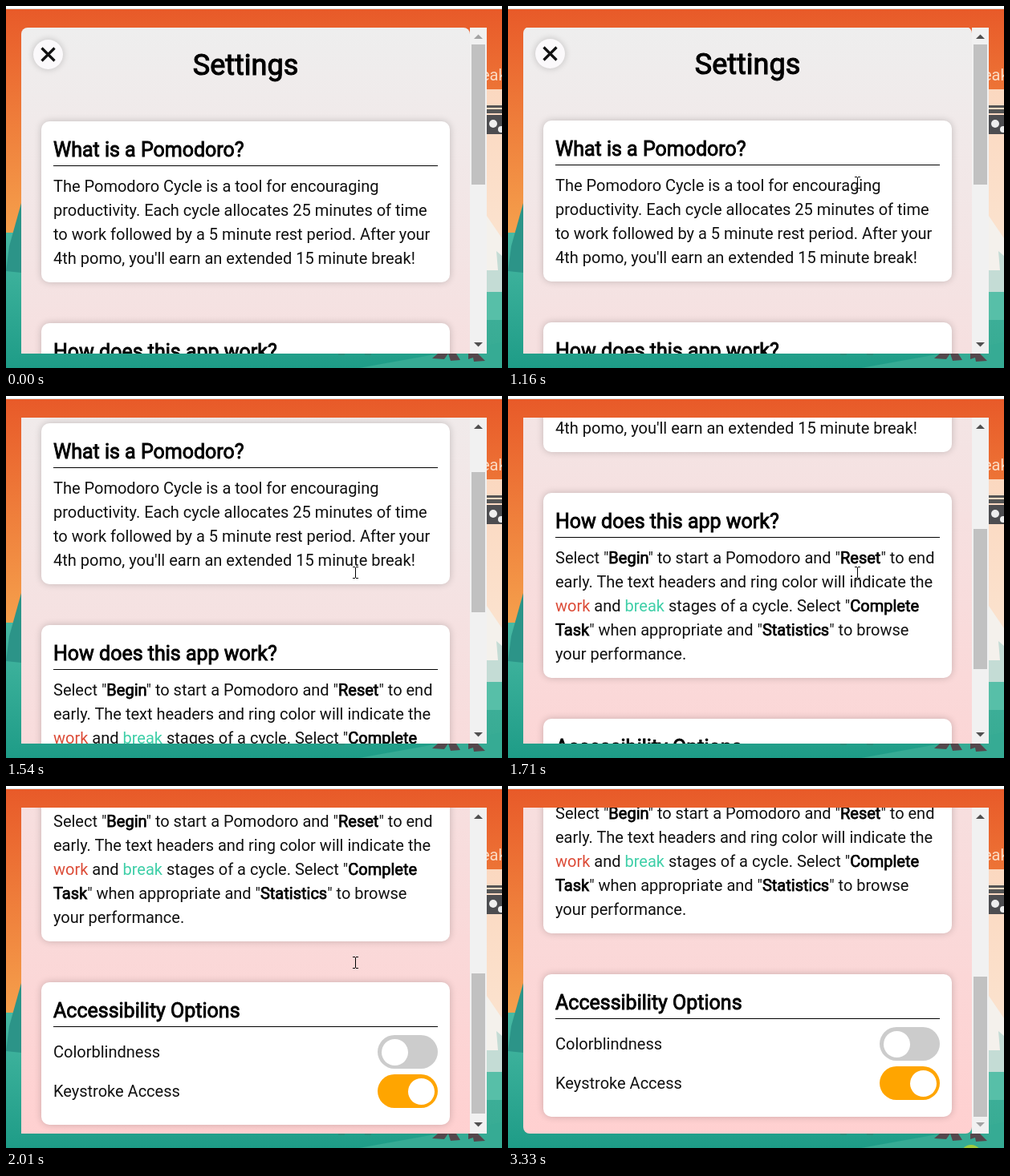
These frames come from a looping animation (618x452 px, 3.42 s). An HTML page with a canvas:

```html
<!DOCTYPE html>
<html lang="en">
<head>
<meta charset="utf-8">
<title>Settings panel</title>
<style>
html, body { margin: 0; width: 618px; height: 452px; overflow: hidden; }
body { position: relative; font: 20px/30px Roboto, sans-serif; color: #111; }
canvas { position: absolute; left: 0; top: 0; }
#view { position: absolute; left: 19px; top: 27px; width: 559px; height: 407px; overflow: hidden; }
#page { position: relative; height: 850px; border-radius: 8px; background: linear-gradient(#eee, #ffd0d0); }
h1, h2, p { position: absolute; margin: 0; white-space: nowrap; font-weight: 400; }
h1 { left: 0; width: 100%; top: 26px; font-size: 36px; line-height: 42px; text-align: center;
  color: #000; -webkit-text-stroke: 1.1px; }
h2 { left: 15px; top: 21px; font-size: 25px; line-height: 29px; color: #000; -webkit-text-stroke: .9px; }
p { left: 15px; top: 66px; }
b { font-weight: 400; color: #000; -webkit-text-stroke: .75px; }
.card { position: absolute; left: 25px; width: 509px; border-radius: 10px; background: #fff;
  box-shadow: 0 0 10px rgba(0, 0, 0, .2); }
.card::after { content: ""; position: absolute; left: 15px; top: 55px; width: 479px; height: 1px; background: #000; }
.work { color: #dc4c38; }
.break { color: #3fcfa8; }
.toggle { position: absolute; left: 419px; width: 75px; height: 42px; border-radius: 21px; background: #ccc; }
.toggle::after { content: ""; position: absolute; left: 5px; top: 4.5px; width: 33px; height: 33px;
  border-radius: 50%; background: #fff; }
.toggle.on { background: #ffa500; }
.toggle.on::after { left: 37.5px; }
#close { position: absolute; left: 14.5px; top: 14.5px; width: 37px; height: 37px; border-radius: 50%;
  background: #fbf9fb; box-shadow: 0 0 8px rgba(0, 0, 0, .2); }
#close svg { display: block; }
</style>
</head>
<body>
<canvas id="scene" width="618" height="452"></canvas>
<div id="view">
  <div id="page">
    <div id="close"><svg width="37" height="37"><path d="M10.5 10.5l16 16m0-16l-16 16" stroke="#111" stroke-width="3.2"/></svg></div>
    <h1>Settings</h1>
    <div class="card" style="top:117px;height:201px">
      <h2>What is a Pomodoro?</h2>
      <p>The Pomodoro Cycle is a tool for encouraging<br>
        productivity. Each cycle allocates 25 minutes of time<br>
        to work followed by a 5 minute rest period. After your<br>
        4th pomo, you'll earn an extended 15 minute break!</p>
    </div>
    <div class="card" style="top:369px;height:231px">
      <h2>How does this app work?</h2>
      <p>Select "<b>Begin</b>" to start a Pomodoro and "<b>Reset</b>" to end<br>
        early. The text headers and ring color will indicate the<br>
        <span class="work">work</span> and <span class="break">break</span> stages of a cycle. Select "<b>Complete</b><br>
        <b>Task</b>" when appropriate and "<b>Statistics</b>" to browse<br>
        your performance.</p>
    </div>
    <div class="card" style="top:651px;height:178px">
      <h2>Accessibility Options</h2>
      <p style="top:72px">Colorblindness</p>
      <p style="top:121px">Keystroke Access</p>
      <div class="toggle" style="top:66px"></div>
      <div class="toggle on" style="top:115px"></div>
    </div>
  </div>
</div>
<canvas id="overlay" width="618" height="452"></canvas>
<script>
const LOOP = 3420, MAX_SCROLL = 443;
const page = document.getElementById('page');
const bg = document.getElementById('scene').getContext('2d');
const top2d = document.getElementById('overlay').getContext('2d');

// [time, scroll offset]
const scrollKeys = [
  [0, 0], [1160, 1], [1240, 10], [1320, 30], [1400, 62], [1480, 110], [1560, 166], [1630, 219],
  [1710, 275], [1780, 324], [1860, 371], [1930, 406], [2010, 433], [2090, 441], [2170, 443]
];
// [time, pointer shape, x, y]
const pointerKeys = [
  [0, ''], [230, 'arrow', 543, 412], [310, 'arrow', 515, 366], [400, 'beam', 474, 298],
  [480, 'beam', 440, 242], [560, 'beam', 422, 212], [650, 'beam', 429, 216], [730, 'beam', 435, 220],
  [2550, 'arrow', 436, 244], [2630, 'arrow', 445, 258], [2710, 'arrow', 464, 290],
  [2790, 'arrow', 494, 341], [2860, 'arrow', 526, 396], [2940, 'arrow', 553, 436], [3020, '']
];

function keyAt(keys, t) {
  let key = keys[0];
  for (const k of keys) if (k[0] <= t) key = k;
  return key;
}

function rect(c, color, x, y, w, h) {
  c.fillStyle = color;
  c.fillRect(x, y, w, h);
}

function poly(c, color, ...pts) {
  c.beginPath();
  for (let i = 0; i < pts.length; i += 2) c.lineTo(pts[i], pts[i + 1]);
  c.closePath();
  c.fillStyle = color;
  c.fill();
}

function disc(c, color, x, y, r) {
  c.beginPath();
  c.arc(x, y, r, 0, Math.PI * 2);
  c.fillStyle = color;
  c.fill();
}

function fade(c, y0, y1, from, to) {
  const g = c.createLinearGradient(0, y0, 0, y1);
  g.addColorStop(0, from);
  g.addColorStop(1, to);
  return g;
}

function drawScene() {
  const c = bg;
  rect(c, '#fff', 0, 0, 618, 4);
  rect(c, fade(c, 4, 283, '#e85a29', '#f5a04c'), 0, 4, 618, 280);
  rect(c, '#dcdcdc', 0, 3, 618, 1);
  rect(c, fade(c, 283, 452, '#48b9a3', '#1e9c87'), 0, 283, 618, 169);
  poly(c, '#2c9488', 19, 246, 19, 333, 0, 331, 4, 300);

  // right edge
  rect(c, fade(c, 104, 300, '#fbd8c0', '#fbe3cf'), 599, 104, 19, 200);
  c.font = '20px Roboto, sans-serif';
  c.fillStyle = '#fbdcc4';
  c.fillText('eak', 592, 93);
  rect(c, '#555', 599, 124, 19, 3);
  rect(c, '#555', 599, 129, 19, 5);
  rect(c, '#4d4d50', 599, 136, 19, 24);
  disc(c, '#eee', 607, 147, 5);
  disc(c, '#eee', 617, 154, 4);
  rect(c, '#c4dcd5', 599, 290, 19, 67);
  poly(c, '#f4f1ec', 599, 262, 618, 290, 618, 312, 611, 306, 613, 330, 599, 330);
  rect(c, '#57bfa8', 599, 357, 19, 38);
  rect(c, fade(c, 392, 452, '#3cae97', '#35aa92'), 599, 392, 19, 60);
  poly(c, '#36ab94', 440, 452, 618, 420, 618, 452);

  // legs under the panel
  const leg = '#54474c';
  poly(c, leg, 538, 434, 551, 434, 546, 441, 531, 440);
  poly(c, leg, 551, 434, 561, 434, 566, 442, 554, 443);
  poly(c, leg, 576, 434, 588, 434, 597, 443, 583, 444, 582, 439, 576, 441);
  rect(c, '#2c8f7e', 414, 434, 8, 2);
  rect(c, '#2c8f7e', 447, 434, 8, 2);
}

function drawScrollbar(c, s) {
  const color = off => off ? '#a3a3a3' : '#505050';
  rect(c, '#f1f1f1', 578, 27, 21, 407);
  rect(c, '#c1c1c1', 580, 48 + Math.round(s * .4285), 17, 175);
  poly(c, color(s === 0), 583, 41, 588.5, 35.5, 594, 41);
  poly(c, color(s === MAX_SCROLL), 583, 420, 588.5, 425.5, 594, 420);
}

function drawPointer(c, shape, x, y) {
  if (shape === 'beam') {
    rect(c, '#000', x, y - 6, 1, 13);
    for (const dy of [-7, 7]) {
      rect(c, '#000', x - 3, y + dy, 3, 1);
      rect(c, '#000', x + 1, y + dy, 3, 1);
    }
  } else if (shape === 'arrow') {
    c.save();
    c.translate(x + .5, y + .5);
    poly(c, '#fff', 0, 0, 0, 16, 3.7, 12.5, 6.5, 18.5, 9, 17.5, 6.5, 11.5, 11, 11.3);
    c.strokeStyle = '#000';
    c.lineWidth = 1;
    c.stroke();
    c.restore();
  }
}

function draw(t) {
  const s = keyAt(scrollKeys, t)[1];
  page.style.transform = `translateY(${-s}px)`;
  top2d.clearRect(0, 0, 618, 452);
  drawScrollbar(top2d, s);
  if (t >= 3330) disc(top2d, '#a0cc3e', 577, 461, 13);
  const [, shape, x, y] = keyAt(pointerKeys, t);
  drawPointer(top2d, shape, x, y);
}

const start = performance.now();
function tick() {
  draw((performance.now() - start) % LOOP);
  requestAnimationFrame(tick);
}
drawScene();
tick();
</script>
</body>
</html>
```
